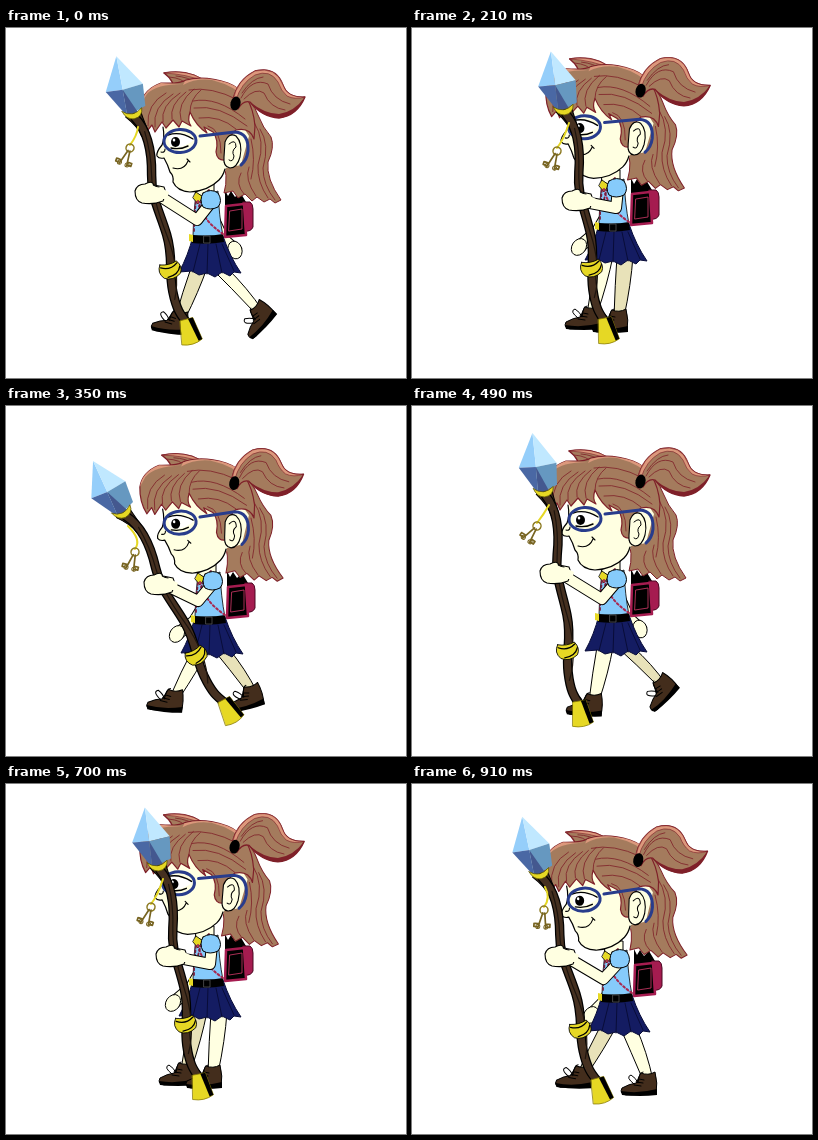
These frames come from a looping animation (400 px wide and 350 px high, 980 ms). An HTML page with a canvas:

```html
<!DOCTYPE html>
<html lang="en">
<head>
<meta charset="utf-8">
<title>Walking with a crystal staff</title>
<style>
html, body { margin: 0; width: 100%; height: 100%; overflow: hidden; background: #fff; }
canvas { display: block; }
</style>
</head>
<body>
<canvas id="stage" width="400" height="350"></canvas>
<script>
const ctx = document.getElementById('stage').getContext('2d');
const STEP = 70, STEPS = 14;
const SKIN = '#ffffe1', SHADED = '#e8e2b9', HAIR = '#a47b5d', RIM = '#dc987c', WINE = '#7f2029',
      SHIRT = '#86cbfb', NAVY = '#141c62', GOLD = '#e6d824', WOOD = '#453020',
      CRIMSON = '#a51c50', FRAME = '#283c8c', BROWN = '#432d1c';

// One row per pose of a stride; the last row is the second contact pose.
const HEAD = [[0,0,0], [0,-6,.5], [0,-9,1], [-1.5,-13,1], [-1.5,1,-2.3], [0,2,-2], [-2,1,-2], [-1,0,0]];
const BODY = [[0,0], [0,-5], [1,-10], [0,-12], [3,3], [2,3], [3,3], [0,1]];
const STAFF = [[127,86,14.2], [146,81,8], [161,88,5.6], [152,82,10.7], [137,99,15.6], [117,107,28], [128,90,15.3], [132,86,9.2]];
const KEYS = [[124,120,20], [136,117,50], [145,114,84], [145,123,18], [140,135,4], [129,146,14], [132,126,4], [125,120,34]];
const HAND = [[144,165], [155,167], [165,172], [165,172], [153,177], [153,178], [148,172], [143,167]];
const FAR_HAND = [[229,222], [205,222], [171,222], [167,219], [160,226], [171,228], [179,231], [228,223]];
const FRONT_FOOT = [[174,288,8], [222,276,-45], [202,277,-35], [180,283,0], [157,281,20], [169,288,6], [171,286,2], [182,292,4]];
const BACK_FOOT = [[252,280,-46], [193,290,0], [208,288,0], [207,286,0], [233,290,0], [246,283,-14], [236,293,0], [249,275,-44]];

const rad = deg => deg * Math.PI / 180;

function shape(d, fill, stroke, width = 1) {
  const path = new Path2D(d);
  if (fill) { ctx.fillStyle = fill; ctx.fill(path); }
  if (stroke) { ctx.strokeStyle = stroke; ctx.lineWidth = width; ctx.stroke(path); }
}

function oval(x, y, rx, ry, fill, stroke, width = 1, turn = 0) {
  ctx.beginPath();
  ctx.ellipse(x, y, rx, ry, turn, 0, 7);
  if (fill) { ctx.fillStyle = fill; ctx.fill(); }
  if (stroke) { ctx.strokeStyle = stroke; ctx.lineWidth = width; ctx.stroke(); }
}

function placed(x, y, deg, draw) {
  ctx.save();
  ctx.translate(x, y);
  ctx.rotate(rad(deg));
  draw();
  ctx.restore();
}

function limb(points, width) {
  const d = 'M' + points.join('L');
  shape(d, null, '#000', width + 2);
  shape(d, null, SKIN, width);
}

function leg(x, y, foot, skin) {
  const [fx, fy] = foot, mx = (x + fx) / 2, my = (y + fy) / 2;
  shape(`M${x - 8},${y}Q${mx - 7},${my} ${fx - 5},${fy + 3}L${fx + 5},${fy + 3}Q${mx + 9},${my} ${x + 8},${y}Z`, skin, '#000');
  shoe(foot);
}

function shoe([x, y, deg]) {
  placed(x, y, deg, () => {
    shape('M-7,-4Q0,-1 7,-5Q10,6 8,17L-22,18Q-29,17 -26,11Q-19,7 -12,6Z', BROWN, '#000');
    shape('M-27,14Q-10,17 9,12V18Q-8,20 -26,18Z', '#000');
    shape('M-14,7Q-23,0 -17,-2Q-12,1 -10,6Q-9,-5 -5,-5M-14,8L-7,9M-12,5L-5,6M-9,2L-4,3', null, '#000');
  });
}

function farArm([x, y], [bx, by]) {
  limb([[204 + bx, 184 + by], [(204 + bx + x) / 2, (200 + by + y) / 2], [x, y]], 11);
  oval(x, y, 7, 9, SKIN, '#000', 1, x < 200 ? .6 : -.3);
}

function torso() {
  shape('M187,208L217,208Q224,229 235,245L228,244L224,248L216,244L209,249L201,245L193,247L186,243L173,244Q182,228 187,208Z', NAVY, '#080c38');
  shape('M194,216L187,244M202,216L201,246M210,216L216,245M216,216L228,243', null, '#080c38');

  shape('M219,162L222,168L225,163L229,169L234,164L240,174L239,207L219,208Z', '#000');
  shape('M237,174H244Q247,176 247,181V199Q245,204 239,203Z', CRIMSON, '#4a0822');
  shape('M220,178L238,176L240,207L219,209Z', '#000', CRIMSON, 2.5);
  shape('M224,183L236,181L236,201L223,203Z', '#000', '#d43a6a', .8);

  shape('M190,154H208V170H190Z', SKIN, '#000');
  shape('M190,165L198,169L212,163Q213,188 217,208H187Q187,188 190,165Z', SHIRT, '#000', .8);
  shape('M187,207Q202,209 217,206L218,214Q202,217 186,215Z', '#000');
  shape('M198,208L204,208V215H198Z', null, '#555', .8);
  shape('M183,206L187,207L187,214L183,213Z', GOLD);
  shape('M190,164L197,169L192,176L187,170Z', GOLD, '#000', .8);
  ctx.setLineDash([2, 2.5]);
  shape('M192,173Q196,192 217,206', null, '#a82850', 2);
  shape('M203,162Q195,169 192,184M190,174Q188,188 188,203', null, '#781e3c', 1.8);
  ctx.setLineDash([]);
}

function head() {
  // far pigtail and back hair
  shape('M158,45Q174,42 188,47Q197,51 202,57L167,64Q170,54 158,45Z', HAIR, WINE, 1.3);
  shape('M158,45Q174,42 188,47Q196,50 200,54Q181,46 158,45Z', RIM, WINE, .6);
  shape('M163,49Q177,50 181,57M170,48Q182,49 191,55', null, WINE, .8);
  shape('M212,64Q241,59 252,87Q257,100 265,109Q269,119 262,134Q260,151 275,172L269,175L264,171L258,174L251,169L246,173L239,166L232,170L227,163L218,165Q223,148 216,130Z', HAIR, WINE);
  shape('M248,94Q260,113 252,137Q251,154 262,170M254,101Q264,116 257,140Q257,157 269,172M243,139Q238,151 250,168M235,145Q229,156 238,166M245,111Q250,132 245,151', null, WINE, .8);

  // face
  shape('M157,91Q159,108 156,117Q150,124 151,128Q153,131 158,130Q162,137 164,144Q168,148 167,154Q171,163 184,164Q202,163 213,152Q219,147 220,140L235,137L243,108L232,91L190,76Z', SKIN);
  shape('M157,99Q159,110 156,117Q150,124 151,128Q153,131 158,130Q162,137 164,144Q168,148 167,154Q171,163 184,164Q202,163 213,152Q217,148 219,141', null, '#000', 1.2);
  shape('M167,140Q178,143 182,133M181,131L184,134M155,124Q159,125 159,121', null, '#000', 1.1);

  // eye
  shape('M162,109Q173,100 188,112Q176,122 164,118Z', '#fff');
  oval(169.5, 114, 4.5, 5, '#000');
  oval(168, 112, 1.3, 1.5, '#fff');
  shape('M162,107Q174,103 187,111M165,120Q174,122 182,118', null, '#000', 1.4);

  // fringe
  shape('M141,103Q134,91 135,76Q138,61 155,55Q174,56 180,52Q198,47 222,55Q246,64 249,98L248,111Q244,99 230,102Q220,110 219,132Q211,133 210,124Q213,112 207,104L198,99L201,105Q190,98 184,84Q181,93 185,98L176,93L173,99L167,92L160,100L156,94L149,104L146,97Z', HAIR, WINE, 1.2);
  shape('M135,76Q138,61 155,55Q168,56 177,56Q150,56 141,66Z', RIM);
  shape('M179,53Q198,47 222,55Q236,60 243,73Q230,58 206,52Q190,50 177,57Z', RIM);
  shape('M142,98Q140,76 160,65M149,99Q146,79 167,66M157,94Q154,78 174,65M166,91Q163,77 180,64M175,92Q170,76 188,61M184,84Q184,71 195,62', null, WINE, .8);
  shape('M183,62Q205,58 232,72M187,73Q211,68 239,91M188,80Q213,76 241,98M193,90Q214,87 230,101M202,98Q215,101 215,125', null, WINE, .8);

  // ear and glasses
  shape('M219,114Q223,104 230,108Q237,115 234,129Q231,140 224,140Q217,139 218,129Z', SKIN, '#000', 1.1);
  shape('M223,116Q230,110 230,119Q225,123 228,128Q227,135 223,132', null, '#000');
  shape('M194,108L229,104Q243,105 242,123Q241,132 235,137', null, FRAME, 3);
  oval(174, 113, 16, 11.5, null, FRAME, 3, -.05);

  // near pigtail
  shape('M227,72Q231,52 249,43Q270,38 277,57Q281,70 299,69Q291,88 273,90Q256,89 244,74Q237,72 232,81Z', HAIR, WINE, 1.3);
  shape('M227,72Q231,52 249,43Q270,38 277,57Q281,70 299,69Q289,72 281,68Q275,63 272,54Q264,41 249,47Q235,55 230,72Z', RIM, WINE, .6);
  shape('M299,69Q291,88 273,90Q256,89 244,74Q259,86 273,86Q288,84 299,69Z', WINE);
  shape('M235,70Q246,49 262,56Q267,72 284,76M238,71Q250,59 258,65Q264,80 279,82M236,65Q246,50 257,49', null, WINE, .8);
  oval(229.5, 75.5, 5, 7, '#000', null, 1, .25);
}

function staff() {
  shape('M-2,-60L-21,-28L-4,-26Z', '#95cefa');
  shape('M-2,-60L-4,-26L17,-27Z', '#c0e8ff');
  shape('M-21,-28L-4,-26L-6,1Z', '#4a68a4');
  shape('M-4,-26L17,-27L14,-5L-6,1Z', '#6698c0');
  shape('M-4,-26L5,-1L-6,1Z', '#44588f');

  const shaft = 'M1,4C10,20 9,42 3,64S2,100 3,125S-4,160 -5,182S-2,208 3,220';
  shape('M-8,1L8,0Q9,10 11,24L3,24Q2,14 -8,1Z', WOOD, '#000');
  shape(shaft, null, '#000', 9.5);
  shape(shaft, null, WOOD, 7);
  shape('M7,20Q8,42 3,64T3,125T-5,190', null, '#1d140d', 1.2);
  shape('M-10,-5Q-1,4 10,-4Q9,5 0,5Q-8,4 -10,-5Z', GOLD, '#5d5500', .7);

  shape('M-11,153Q-2,156 6,153Q11,160 7,166Q-2,172 -10,167Q-16,160 -11,153Z', GOLD, '#000', .8);
  shape('M-11,156Q-2,161 6,155M-6,167Q5,167 8,159', null, '#000', 1.3);
  shape('M-5,212L8,212L12,235Q2,240 -9,236Z', GOLD, '#867900', .7);
  shape('M3,212L8,212L12,235L8,236Z', '#000');
}

function keys([x, y, deg], [sx, sy]) {
  shape(`M${sx + 5},${sy + 13}Q${x + 7},${y - 12} ${x},${y - 3}`, null, GOLD, 2);
  placed(x, y, deg, () => {
    oval(0, 0, 4, 4, null, '#8d7b23', 1.5);
    shape('M-1,3L-5,18M1,3L3,18M-5,17H-9V14M-5,14H-8M3,17H7V14M3,14H6', null, '#776421', 1.7);
    oval(-5, 17, 2, 2, null, '#776421');
    oval(3, 17, 2, 2, null, '#776421');
  });
}

// The elbow swings forward as the body sinks.
function nearArm([hx, hy], [bx, by]) {
  const sx = 206 + bx, sy = 173 + by;
  const ex = hx + (sx - hx) * (.76 - .016 * by);
  limb([[sx, sy], [ex, sy + 19], [hx + 8, hy + 2]], 10);
  placed(hx, hy, 0, () => {
    shape('M-15,-2Q-13,-9 -5,-9Q2,-13 4,-8L14,-6Q17,0 13,8Q3,12 -8,10Q-15,8 -15,-2Z', SKIN, '#000', 1.1);
    shape('M13,-4L19,-1L17,6L12,6Z', SKIN);
    shape('M3,-8Q6,-6 9,-6', null, '#000');
  });
  placed(bx, by, 0, () =>
    shape('M197,165Q205,160 212,165Q217,173 212,179Q204,183 197,179Q193,172 197,165Z', SHIRT, '#000'));
}

function legs(step, p, [bx, by]) {
  const drawFront = skin => leg(193 + bx, 240 + by, FRONT_FOOT[p], skin);
  const drawBack = skin => leg(213 + bx, 240 + by, BACK_FOOT[p], skin);
  const farIsBack = step > 0 && step <= 7;
  (farIsBack ? drawBack : drawFront)(SHADED);
  (farIsBack ? drawFront : drawBack)(SKIN);
}

function draw(step) {
  const p = step === 7 ? 7 : step % 7;
  const body = BODY[p], [hx, hy, tilt] = HEAD[p], [sx, sy, lean] = STAFF[p];
  ctx.fillStyle = '#fff';
  ctx.fillRect(0, 0, 400, 350);
  ctx.lineJoin = ctx.lineCap = 'round';

  farArm(FAR_HAND[p], body);
  legs(step, p, body);
  placed(...body, 0, torso);
  placed(220 + hx, 110 + hy, tilt, () => { ctx.translate(-220, -110); head(); });
  placed(sx, sy, -lean, staff);
  keys(KEYS[p], STAFF[p]);
  nearArm(HAND[p], body);
}

const start = performance.now();
function tick() {
  draw(Math.floor((performance.now() - start) / STEP) % STEPS);
  requestAnimationFrame(tick);
}
tick();
</script>
</body>
</html>
```
